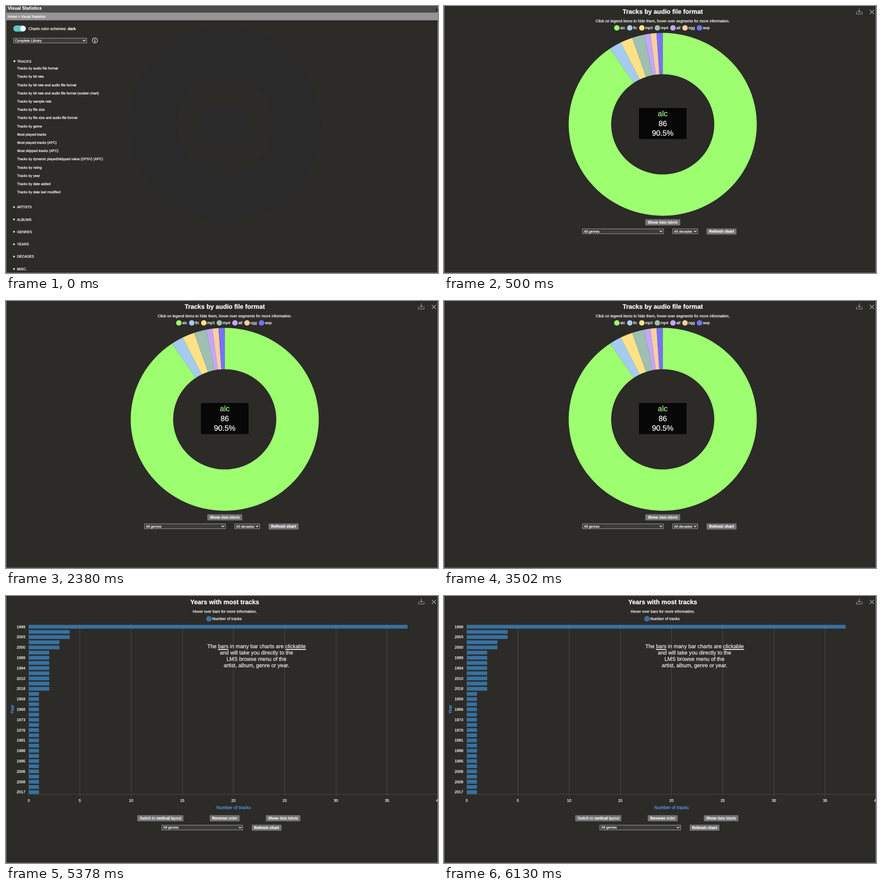
An HTML page that plays this animation: 951 px wide and 589 px high, repeating every 8 s.

```html
<!DOCTYPE html>
<html lang="en">
<head>
<meta charset="utf-8">
<title>Visual Statistics</title>
<style>
html, body { margin: 0; width: 100%; height: 100%; overflow: hidden; background: #2c2b28; }
svg { display: block; width: 951px; height: 589px; }
text {
  font-family: "Liberation Sans", Arial, sans-serif; text-rendering: geometricPrecision; white-space: pre;
  color: #fff; fill: currentColor; stroke: currentColor; stroke-width: .25px;
}
.b { font-weight: bold; }
</style>
</head>
<body>
<svg id="stage" viewBox="0 0 951 589"></svg>
<script>
const BG = '#2c2b28';
const BAR = '#3871a0';
const AXIS = '#559ff0';
const SHADE = '#2a2a2a';

const text = (x, y, size, str, attrs = '') =>
  `<text x="${x}" y="${y}" font-size="${size}" ${attrs}>${str}</text>`;
const mid = (x, y, size, str, attrs = '') => text(x, y, size, str, 'text-anchor="middle" ' + attrs);
const bold = str => `<tspan class="b">${str}</tspan>`;
const rect = (x, y, w, h, fill, attrs = '') =>
  `<rect x="${x}" y="${y}" width="${w}" height="${h}" fill="${fill}" ${attrs}/>`;
const dot = (x, y, r, fill) => `<circle cx="${x}" cy="${y}" r="${r}" fill="${fill}"/>`;
const line = (d, stroke, width = 1) =>
  `<path d="${d}" fill="none" stroke="${stroke}" stroke-width="${width}"/>`;

const button = (x, y, w, label) =>
  rect(x, y, w, 13.4, '#747474', 'rx="1.2"') + mid(x + w / 2, y + 9.4, 8.5, label);
const select = (x, y, w, label) =>
  rect(x + .5, y + .5, w - 1, 10.6, '#3a3a39', 'stroke="#b4b4b4" stroke-width=".9"') +
  text(x + 3.5, y + 8.4, 7.75, label) +
  line(`M${x + w - 9} ${y + 4.3}l2.8 2.8 2.8-2.8`, '#fff', 1.3);

const frame = rect(0, 0, 1, 589, '#8c8c8c') + rect(950, 0, 1, 589, '#8c8c8c') + rect(0, 588, 951, 1, '#6e6e6e');
const icons =
  line('M908 12.5v5.2h12.3v-5.2M914.2 5.5v8.2M911 10.8l3.2 3.2 3.2-3.2', '#969696', 1.3) +
  line('M937.5 8.5l9 9M946.5 8.5l-9 9', '#a2a2a2', 1.5);

function menu() {
  const tracks = [
    'Tracks by audio file format', 'Tracks by bit rate', 'Tracks by bit rate and audio file format',
    'Tracks by bit rate and audio file format (scatter chart)', 'Tracks by sample rate',
    'Tracks by file size', 'Tracks by file size and audio file format', 'Tracks by genre',
    'Most played tracks', 'Most played tracks (APC)', 'Most skipped tracks (APC)',
    'Tracks by dynamic played/skipped value (DPSV) (APC)', 'Tracks by rating', 'Tracks by year',
    'Tracks by date added', 'Tracks by date last modified'];
  const sections = ['ARTISTS', 'ALBUMS', 'GENRES', 'YEARS', 'DECADES', 'MISC.'];
  return `<circle cx="482" cy="261" r="159" fill="none" stroke="${SHADE}" stroke-width="106"/>` +
    rect(427, 224, 108, 72, SHADE) +
    rect(0, 0, 951, 14.5, '#4a4a4a') + rect(0, 14.5, 951, 17, '#959595') +
    text(4, 7.8, 9.75, 'Visual Statistics', 'class="b"') +
    text(4, 25.9, 7.7, 'Home &gt; Visual Statistics') +
    '<path d="M951 4l-4 3 1 5h3z" fill="#111"/>' +
    rect(16, 43, 28, 13.5, '#5cc6c0', 'rx="6.75"') + dot(37.3, 49.7, 6, '#fff') +
    text(49.5, 53, 8.45, 'Charts color schemes: ' + bold('dark')) +
    select(16, 70.5, 162, 'Complete Library') +
    '<circle cx="195.6" cy="76" r="5.7" fill="none" stroke="#fff" stroke-width="1.1"/>' +
    dot(195.6, 73.2, .9, '#fff') + line('M194.2 75.4h1.6v3.8M194 79.3h3.4', '#fff', 1.1) +
    '<path d="M16 120.3h5.2l-2.6 4.6z" fill="#fff"/>' + text(24.4, 125.3, 7.75, 'TRACKS') +
    tracks.map((s, i) => text(24.5, 140.2 + 18.2 * i, 7.7, s)).join('') +
    sections.map((s, i) => {
      const y = 443.5 + 27.3 * i;
      return `<path d="M16.2 ${y - 2.5}v5l4.2-2.5z" fill="#fff"/>` + text(24.2, y + 2.7, 7.75, s);
    }).join('');
}

function donut() {
  // name, tracks, colour, legend x
  const slices = [
    ['alc', 86, '#9dff70', 380.5], ['flc', 2, '#a4ccf0', 409], ['mp3', 2, '#ffe287', 435.5],
    ['mp4', 2, '#9dc0b0', 469.7], ['aif', 1, '#c4a7fb', 504], ['ogg', 1, '#fdcf9f', 530.6],
    ['wvp', 1, '#7573f6', 562.5]];
  const total = 95;
  const point = (n, rx, ry) => {
    const a = n / total * 2 * Math.PI;
    return `${481.5 + rx * Math.sin(a)} ${261 - ry * Math.cos(a)}`;
  };
  let sum = 0, out = '';
  for (const [name, n, color, x] of slices) {
    const from = sum, to = sum += n, big = +(n > total / 2);
    out += `<path fill="${color}" d="M${point(from, 207, 201.7)}A207 201.7 0 ${big} 1 ${point(to, 207, 201.7)}` +
      `L${point(to, 113.5, 110.6)}A113.5 110.6 0 ${big} 0 ${point(from, 113.5, 110.6)}z"/>` +
      dot(x, 48.3, 6, color) + text(x + 7.4, 51.2, 8.5, name);
  }
  return icons + mid(481.5, 17, 13.95, 'Tracks by audio file format', 'class="b"') +
    mid(481.5, 35.5, 8.5, 'Click on legend items to hide them, hover over segments for more information.') +
    out + rect(429, 225, 105, 68.6, '#080707', 'rx="2"') +
    mid(481.5, 242.5, 16.8, 'alc', 'style="color:#a9f58a"') +
    mid(481.5, 264.5, 16.8, '86') + mid(481.5, 285.8, 16.8, '90.5%') +
    button(443, 470.5, 77, bold('Show') + ' data labels') +
    select(304.5, 491.2, 179, 'All genres') + select(503, 491.2, 56, 'All decades') +
    button(578, 490.8, 66, bold('Refresh chart'));
}

function bars() {
  const years = [1999, 2003, 2000, 1989, 1994, 2010, 2018, 1959, 1966, 1973, 1976, 1981, 1988, 1995, 2006, 2008, 2017];
  const counts = [37, 4, 4, 3, 3, ...Array(8).fill(2), ...Array(20).fill(1)];
  const unit = 22.54;
  let out = '';
  for (let n = 0; n <= 40; n += 5) {
    const x = 50 + n * unit;
    if (n < 40) out += line(`M${Math.floor(x) + .5} 62V442`, '#4b4a48');
    out += mid(x, 454, 8.5, n);
  }
  out += line('M50 437.5H951', '#4b4a48');
  counts.forEach((n, i) => {
    const y = 67.8 + 11.4 * i;
    out += rect(50, y - 4.1, n * unit, 8.2, BAR);
    if (i % 2 === 0) out += text(42.5, y + 2.8, 8.5, years[i / 2], 'text-anchor="end"');
  });
  const note = ['The bars in many bar charts are clickable', 'and will take you directly to the',
    'LMS browse menu of the', 'artist, album, genre or year.'];
  return icons + mid(481.5, 18.2, 14, 'Years with most tracks', 'class="b"') +
    mid(481.5, 37, 8.5, 'Hover over bars for more information.') +
    dot(446.8, 50.3, 6.2, BAR) + text(454, 53.3, 8.5, 'Number of tracks') + out +
    note.map((s, i) => mid(551.4, 115.2 + 14 * i, 11.87, s, 'style="color:#f0f0f0"')).join('') +
    rect(466.5, 117, 23, 1.8, '#fff') + rect(615, 117, 45.5, 1.8, '#fff') +
    mid(501, 470, 10, 'Number of tracks', `style="color:${AXIS}"`) +
    mid(0, 0, 10, 'Year', `transform="translate(16.5 250) rotate(-90)" style="color:${AXIS}"`) +
    button(289, 483.6, 101.5, `Switch to ${bold('vertical')} layout`) +
    button(448.5, 483.6, 66, bold('Reverse') + ' order') +
    button(572, 483.6, 76, bold('Show') + ' data labels') +
    select(342.5, 505, 179, 'All genres') + button(541, 504.4, 65.5, bold('Refresh chart'));
}

const stage = document.getElementById('stage');
stage.innerHTML = rect(0, 0, 951, 589, BG) +
  [menu, donut, bars].map(scene => `<g class="scene">${scene()}</g>`).join('') + frame;
const scenes = stage.querySelectorAll('.scene');

function draw(now) {
  const t = now % 8000;
  const current = t < 500 ? 0 : t < 4250 ? 1 : 2;
  scenes.forEach((g, i) => g.style.display = i === current ? '' : 'none');
  requestAnimationFrame(draw);
}
draw(0);
</script>
</body>
</html>
```
